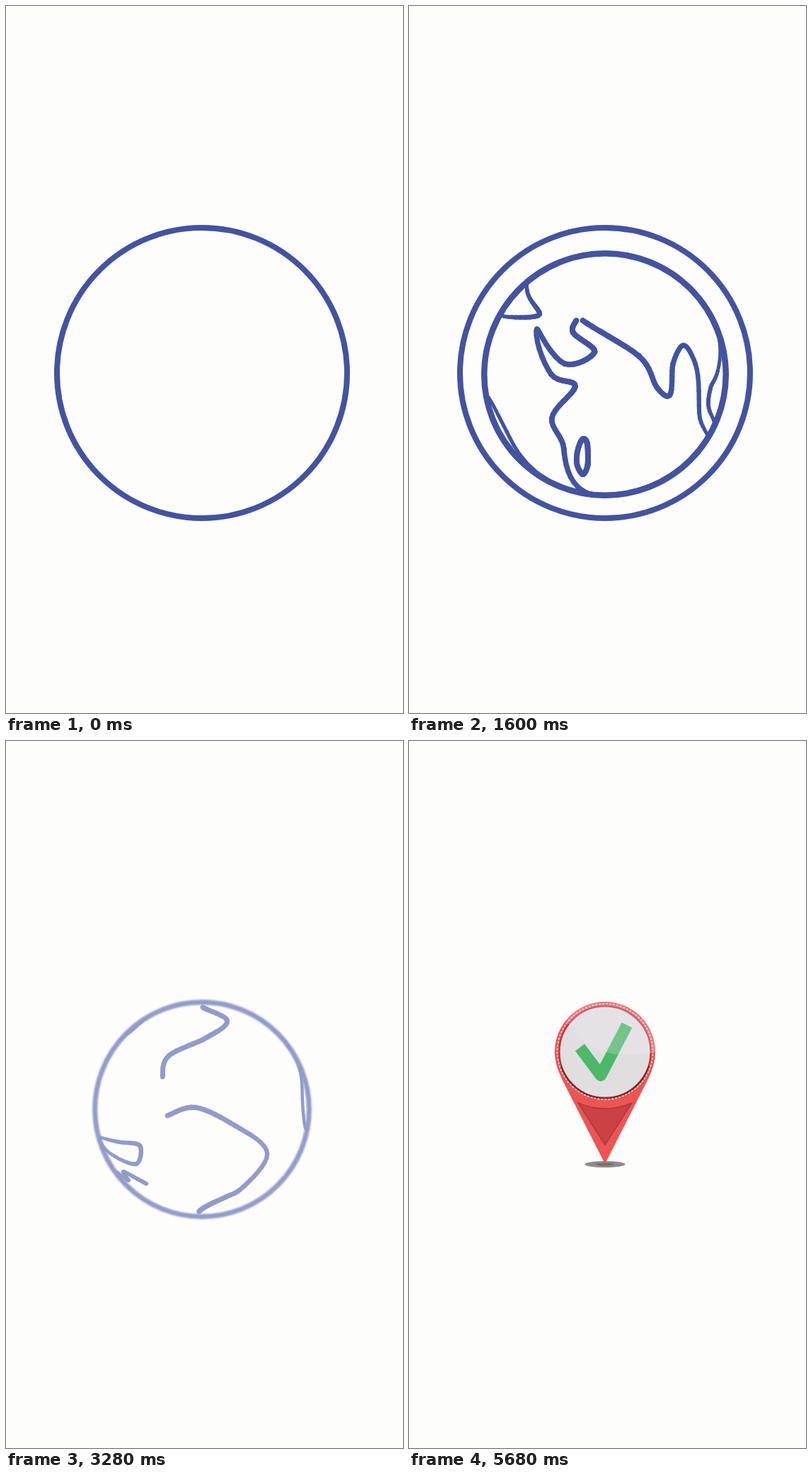
These frames come from a looping animation (561x998 px, 5720 ms). An HTML page with a canvas:

```html
<!DOCTYPE html>
<html lang="en">
<head>
<meta charset="utf-8">
<title>Globe and pin</title>
<style>
html, body { margin: 0; width: 100%; height: 100%; overflow: hidden; background: #fdfdfc; }
canvas, svg { position: absolute; left: 0; top: 0; }
</style>
</head>
<body>
<canvas id="globe" width="561" height="998"></canvas>
<svg width="561" height="998" viewBox="0 0 561 998" fill="none">
  <g id="rings" stroke="#4353a1">
    <circle id="outer" cx="277" cy="518"/>
    <circle id="inner" cx="277" cy="520" stroke-width="8"/>
  </g>
  <g id="pin">
    <clipPath id="shape">
      <path id="body" d="M277 597L217 479C210 464 206 453 206 439A71 71 0 0 1 348 439C348 453 344 464 337 479Z"/>
    </clipPath>
    <ellipse cx="277" cy="597.5" rx="28.5" ry="4.5" fill="#8c8c8c"/>
    <ellipse cx="277" cy="597.5" rx="13" ry="2" fill="#707070"/>
    <use href="#body" fill="#ee5454"/>
    <path id="wedge" fill="#cc4144" stroke="#a83a40" stroke-width="1.5"/>
    <circle cx="277" cy="439" r="64.5" fill="#e0dedf" stroke="#a8393d" stroke-width="2"/>
    <path d="M215 459A65 65 0 0 0 339 459" stroke="#70282c" stroke-width="2"/>
    <circle id="stitch" cx="277" cy="438.5" r="67.5" stroke="#f7cfcf" stroke-width="1.7" stroke-dasharray="3 2"/>
    <path id="check" d="M241.5 432.5L271 472L308 401" stroke="#4cb868" stroke-width="16.5" stroke-linejoin="round"/>
    <path clip-path="url(#shape)" d="M200 360H355V438Q325 446 290 442Q240 432 222 392Z" fill="#f4eef8" opacity=".23"/>
  </g>
</svg>
<script>
const LOOP = 5720, CX = 277, CY = 520, R = 171, BLUE = '#4353a1';
const $ = id => document.getElementById(id);
const ctx = $('globe').getContext('2d');
const ramp = (t, a, b) => Math.min(1, Math.max(0, (t - a) / (b - a)));
const smooth = (t, a, b) => { const p = ramp(t, a, b); return p * p * (3 - 2 * p); };
const turn = t => Math.PI * (1 - Math.cos(Math.PI * (t - 50) / 5000));
const radiusAt = y => Math.sqrt(Math.max(1, R * R - y * y));
const zoom = t => (.7 + .3 * smooth(t, 250, 850)) * (1 - .2 * ramp(t, 2850, 3600));

// Lifts key points seen on the disc at a given time onto the sphere and rounds the line through them.
function coast(time, closed, ...xy) {
  const pts = [], out = [], scale = zoom(time);
  for (let i = 0; i < xy.length; i += 2) {
    const x = (xy[i] - CX) / scale, y = (xy[i + 1] - CY) / scale;
    pts.push([Math.asin(Math.max(-1, Math.min(1, x / radiusAt(y)))) - turn(time), y]);
  }
  const n = pts.length;
  const at = i => pts[closed ? (i + n) % n : Math.max(0, Math.min(n - 1, i))];
  for (let i = 0; i < (closed ? n : n - 1); i++) {
    const [a, b, c, d] = [at(i - 1), at(i), at(i + 1), at(i + 2)];
    for (let u = 0; u <= 1; u += 1 / 8) {
      out.push([0, 1].map(k => b[k] + u / 2 * (c[k] - a[k]
        + u * (2 * a[k] - 5 * b[k] + 4 * c[k] - d[k] + u * (3 * (b[k] - c[k]) + d[k] - a[k])))));
    }
  }
  return out;
}

const asia = coast(1120, false, 157,444, 210,494, 235,538, 257,549, 261,505, 283,479, 303,505,
  325,582, 382,611, 398,603, 347,572, 339,541, 360,515, 386,445, 369,419, 382,395, 350,372);
const africa = coast(2080, false, 361,444, 363,461, 393,488, 360,505, 308,456, 342,520, 373,537,
  333,582, 330,625, 285,683, 256,683, 229,600, 195,553, 140,549, 127,503, 168,432);
const europe = coast(2080, false, 168,432, 235,439, 303,435, 245,401, 215,396, 168,424, 204,391, 206,374);
const madagascar = coast(2080, true, 360,613, 333,645, 325,661, 344,648, 364,618);
const island = coast(520, true, 340,557, 385,563, 402,568, 385,592, 360,580, 338,566);
const australia = coast(520, false, 279,655, 285,632, 328,603, 347,614, 357,602, 367,618);
const southAmerica = coast(2840, false, 121,530, 145,517, 195,546, 263,591, 250,643, 236,660, 236,683);
const northAmerica = coast(2840, false, 124,468, 140,434, 190,405, 242,376, 240,357);
const coasts = [asia, africa, europe, madagascar, island, australia, southAmerica, northAmerica];

function drawGlobe(t) {
  const hide = smooth(t, 3000, 3620);
  ctx.canvas.style.opacity = smooth(t, 250, 520) * (1 - hide);
  ctx.setTransform(1, 0, 0, 1, 0, 0);
  ctx.clearRect(0, 0, 561, 998);
  if (t < 250 || t > 3620) return;
  const scale = zoom(t), angle = turn(t);
  const blur = 4 * (1 - smooth(t, 250, 850)) + 3 * hide;
  ctx.canvas.style.filter = blur > .1 ? `blur(${blur / 4}px)` : 'none';
  ctx.setTransform(scale, 0, 0, scale, CX, CY);
  ctx.strokeStyle = BLUE;
  ctx.lineCap = 'round';
  ctx.filter = blur > .1 ? `blur(${blur}px)` : 'none';
  ctx.lineWidth = 8;
  ctx.beginPath();
  ctx.arc(0, 0, R, 0, 7);
  ctx.stroke();
  ctx.filter = 'none';
  for (const line of coasts) {
    let last = null;
    for (const [lon, y] of line) {
      const depth = Math.cos(lon + angle);
      const point = depth > 0 ? [radiusAt(y) * Math.sin(lon + angle), y] : null;
      if (point && last) {
        ctx.lineWidth = 3.5 + 4.6 * depth;
        ctx.beginPath();
        ctx.moveTo(...last);
        ctx.lineTo(...point);
        ctx.stroke();
      }
      last = point;
    }
  }
}

function drawRings(t) {
  const width = 8 + 8 * Math.sin(Math.PI * ramp(t, 250, 1030)) ** 2;
  $('outer').setAttribute('r', 201 + width / 2);
  $('outer').setAttribute('stroke-width', width);
  $('inner').setAttribute('r', 170.5 * (1 - (1 - ramp(t, 60, 420)) ** 3));
  $('inner').setAttribute('opacity', ramp(t, 60, 200));
  const leave = smooth(t, 2850, 3000);
  $('rings').setAttribute('opacity', 1 - leave);
  $('rings').setAttribute('transform',
    `translate(${CX} ${CY}) scale(${1 - .2 * leave}) translate(${-CX} ${-CY})`);
}

function drawPin(t) {
  $('pin').setAttribute('opacity', smooth(t, 3600, 3820));
  const tip = 576 - 6 * smooth(t, 4240, 5400);
  $('wedge').setAttribute('d', `M239 511Q277 527 315 511L277 ${tip}Z`);
  $('stitch').setAttribute('stroke-dashoffset', -t * .02);
  const length = 129.4 * ramp(t, 3950, 4350);
  $('check').setAttribute('stroke-dasharray', `${length} 300`);
  $('check').setAttribute('visibility', length ? 'visible' : 'hidden');
}

const start = performance.now();
function frame() {
  const t = (performance.now() - start) % LOOP;
  drawGlobe(t);
  drawRings(t);
  drawPin(t);
  requestAnimationFrame(frame);
}
frame();
</script>
</body>
</html>
```
